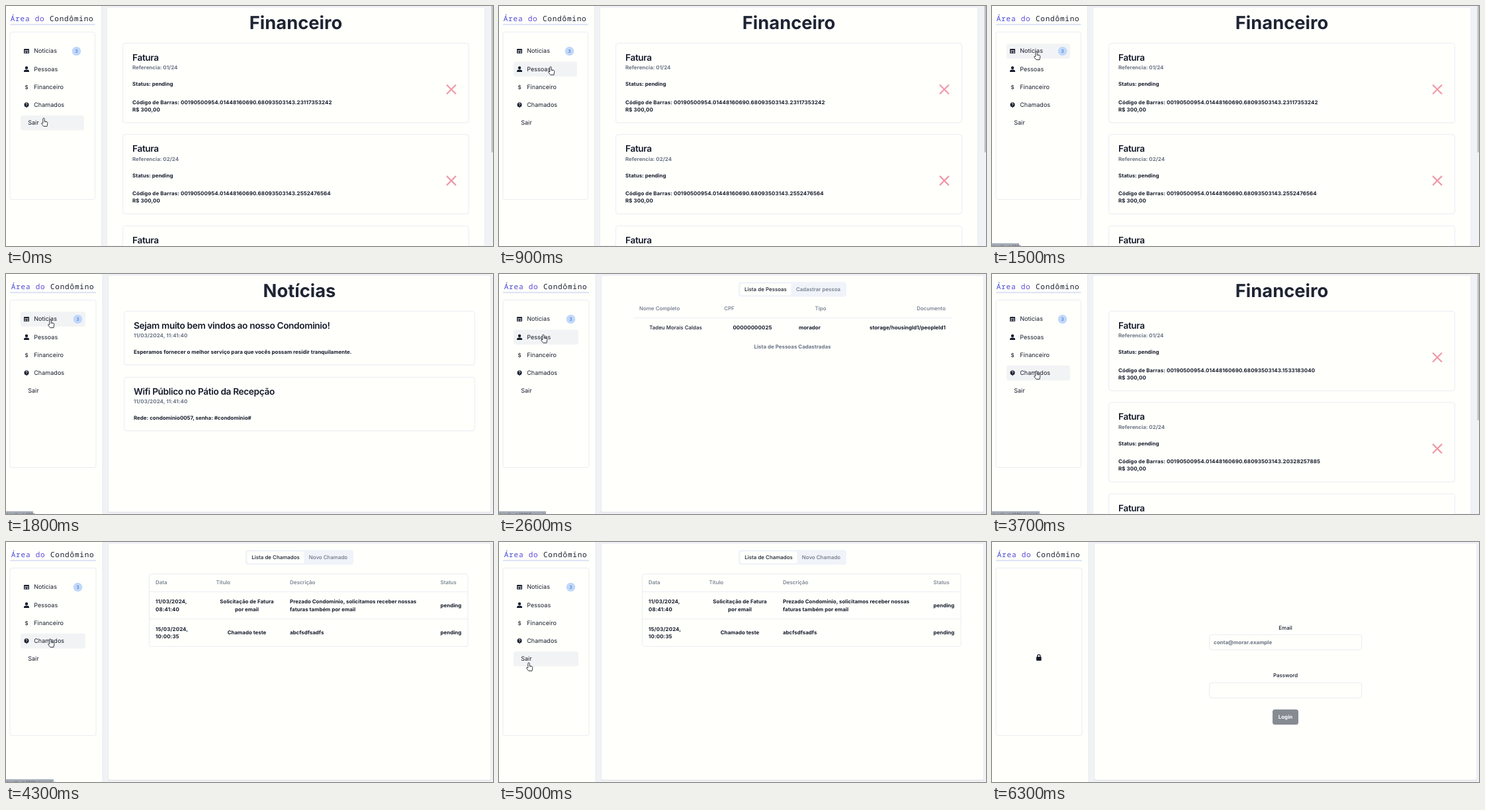
Write an HTML page that moves like this. It is 736 px wide and 364 px high and loops after 6700 ms.

```html
<!DOCTYPE html>
<html lang="pt">
<head>
<meta charset="utf-8">
<title>Área do Condômino</title>
<style>
  html, body { margin: 0; width: 100%; height: 100%; overflow: hidden; background: #f1f2f5; }
  svg { display: block; width: 736px; height: 364px; font: 700 7.9px Inter, sans-serif; letter-spacing: .03px; fill: #151b2a; }
  text { white-space: pre; text-rendering: geometricPrecision; }
  .logo { font: 500 11px "Noto Sans Mono", monospace; letter-spacing: .8px; }
  .h1 { font-size: 27.3px; fill: #1e2433; }
  .h2 { font-size: 13.64px; font-weight: 600; letter-spacing: -.025em; }
  .nav { font-size: 9.04px; font-weight: 400; }
  .digits { letter-spacing: .125px; }
  .muted { fill: #6a7484; }
  .medium { font-weight: 500; }
  .head { fill: #6a7484; font-weight: 500; }
  .badge { font-size: 7px; font-weight: 400; fill: #4568a8; }
  .url { font-size: 6px; font-weight: 400; fill: #3a404a; }
  .middle { text-anchor: middle; }
  .end { text-anchor: end; }
</style>
</head>
<body>
<svg id="stage" viewBox="0 0 736 364"></svg>
<script>
const LOOP = 6700, STEP = 100;
const PAPER = '#fffffc', LINE = '#eaedf2', INK = '#151b2a';
const ROW_TOP = 68.5, ROW_PITCH = 27.2;
const stage = document.getElementById('stage');

const text = (x, y, str, cls = '') => `<text x="${x}" y="${y}" class="${cls}">${str}</text>`;
const rect = (x, y, right, bottom, fill, r = 0, stroke = 'none') =>
  `<rect x="${x}" y="${y}" width="${right - x}" height="${bottom - y}" rx="${r}" fill="${fill}" stroke="${stroke}"/>`;
const path = (d, fill, stroke = 'none', width = 1) =>
  `<path d="${d}" fill="${fill}" stroke="${stroke}" stroke-width="${width}"/>`;
const card = (x, y, right, bottom) =>
  rect(x, y + .6, right, bottom + .6, '#f3f4f6', 4) + rect(x, y, right, bottom, PAPER, 4, LINE);

// [start time, page]
const schedule = [
  [0, 'bills'], [1800, 'news'], [2600, 'people'],
  [3300, 'bills'], [4300, 'tickets'], [5300, 'login']
];

// [time, x, y]
const pointerKeys = [
  [0, 58, 176], [700, 80, 101], [900, 79, 98], [1400, 68, 75], [1800, 68, 75],
  [2100, 68, 98], [2600, 68, 98], [3000, 69, 125], [3300, 69, 125],
  [3700, 68, 153], [4300, 68, 153], [4700, 46, 189], [5300, 46, 189]
];

function pointerAt(t) {
  const i = pointerKeys.findIndex(k => k[0] > t);
  const [t0, x0, y0] = pointerKeys[i - 1], [t1, x1, y1] = pointerKeys[i];
  const u = (t - t0) / (t1 - t0), e = u * u * (3 - 2 * u);
  return { x: x0 + (x1 - x0) * e, y: y0 + (y1 - y0) * e };
}

function bills(t) {
  const codes = t < 1800 ? ['23117353242', '2552476564'] : ['1533183040', '20328257885'];
  const bill = (code, i) => `<g transform="translate(0 ${i * 138.4})">` +
    card(176.5, 56.5, 699.5, 177) +
    text(191, 83, 'Fatura', 'h2') +
    text(191, 96.4, `Referencia: 0${i + 1}/24`, 'muted') +
    text(191, 121.4, 'Status: pending') +
    text(191, 148.5, `Código de Barras: 00190500954.01448160690.68093503143.${code}`, 'digits') +
    text(191, 159.7, 'R$ 300,00', 'digits') +
    path('M666 119.5l14 14m0 -14l-14 14', 'none', '#f09aa8', 2.2) + '</g>';
  return text(438, 35, 'Financeiro', 'h1 middle') + [...codes, ''].map(bill).join('');
}

function news() {
  const post = (y, title, body) => card(178.5, y, 708.5, y + 81.3) +
    text(193, y + 26.5, title, 'h2') +
    text(193, y + 39.8, '11/03/2024, 11:41:40', 'muted digits') +
    text(193, y + 64.9, body);
  return text(443.5, 35, 'Notícias', 'h1 middle') +
    post(56.5, 'Sejam muito bem vindos ao nosso Condominio!',
      'Esperamos fornecer o melhor serviço para que vocês possam residir tranquilamente.') +
    post(156.5, 'Wifi Público no Pátio da Recepção',
      'Rede: condominio0057, senha: #condominio#');
}

const tabs = (active, other, edge, center) =>
  rect(362, 12, 525, 34.5, '#f0f3f9', 4) + rect(364.5, 14.5, edge, 32, PAPER, 2.5) +
  text((364.5 + edge) / 2, 26, active, 'medium middle') +
  text(center, 26, other, 'medium muted middle');

function people() {
  return tabs('Lista de Pessoas', 'Cadastrar pessoa', 441.5, 482.5) +
    text(212, 55, 'Nome Completo', 'head') + text(348, 55, 'CPF', 'head middle') +
    text(486, 55, 'Tipo', 'head middle') + text(675, 55, 'Documento', 'head end') +
    rect(203, 66, 684, 67, LINE) +
    text(267, 83.5, 'Tadeu Morais Caldas', 'medium middle') +
    text(383, 83.5, '00000000025', 'digits middle') + text(469.5, 83.5, 'morador', 'middle') +
    text(675, 83.5, 'storage/housingId1/peopleId1', 'end') +
    text(443.5, 113, 'Lista de Pessoas Cadastradas', 'muted middle');
}

function tickets() {
  const lines = (x, y, rows, cls) =>
    rows.map((s, i) => text(x, y + (i - (rows.length - 1) / 2) * 11.3, s, cls)).join('');
  const row = (y, date, title, body) => lines(226, y, date, 'digits') +
    lines(364, y, title, 'middle') + lines(429, y, body) + text(656.5, y, 'pending');
  const heads = [[226, 'Data'], [317.5, 'Título'], [429, 'Descrição'], [656.5, 'Status']];
  return tabs('Lista de Chamados', 'Novo Chamado', 450.5, 487) +
    rect(216.5, 48.5, 698, 158.5, 'none', 3, LINE) +
    heads.map(([x, s]) => text(x, 64.4, s, 'head')).join('') +
    rect(217, 75, 698, 76, LINE) + rect(217, 116.3, 698, 117.3, LINE) +
    row(99, ['11/03/2024,', '08:41:40'], ['Solicitação de Fatura', 'por email'],
      ['Prezado Condominio, solicitamos receber nossas', 'faturas também por email']) +
    row(140.3, ['15/03/2024,', '10:00:35'], ['Chamado teste'], ['abcfsdfsadfs']);
}

function login() {
  return text(443.5, 132.5, 'Email', 'medium middle') +
    rect(328.5, 140.5, 558.5, 163.5, PAPER, 3.5, LINE) +
    text(335, 155.3, 'conta@morar.example', 'muted') +
    text(443.5, 204.7, 'Password', 'medium middle') +
    rect(328.5, 213.5, 558.5, 236.5, PAPER, 3.5, LINE) +
    rect(424, 254, 463, 277, '#868b92', 3.5) +
    `<g fill="#fff">${text(443.5, 268.4, 'Login', 'middle')}</g>`;
}

const pages = { bills, news, people, tickets, login };

const icons = [
  rect(27, -3.5, 35, 3.5, INK, .8) +
    path('M28 -1h6M28 .8h2.3M28 2.3h2.3M31.5 .8h2.5M31.5 2.3h2.5', 'none', '#fff', .8),
  '<circle cx="31" cy="-2" r="2.2"/>' + path('M27 4.2V3Q27 .8 31 .8T35 3V4.2Z', INK),
  text(31, 3.2, '$', 'medium middle'),
  '<circle cx="31" cy="-.4" r="3.5"/>' + path('M30 2h2.5L31 4.6Z', INK) +
    path('M29.8 -1.4Q29.9 -2.5 31 -2.5T32.2 -1.4Q32.2 -.8 31 0V.6M31 1.3V2', 'none', '#fff', .8),
  ''
];

function nav(shift, hovered) {
  const labels = ['Noticias', 'Pessoas', 'Financeiro', 'Chamados', 'Sair'];
  return labels.map((label, i) => `<g transform="translate(0 ${ROW_TOP + i * ROW_PITCH})">` +
    (i === hovered ? rect(22, -11.3, 118 + shift, 11.3, '#f2f3f5', 3.5) : '') +
    icons[i] + text(i < 4 ? 42.2 : 33.2, 2.9, label, 'nav') + '</g>').join('') +
    `<circle cx="${106.5 + shift}" cy="68.5" r="6.8" fill="#bfd8fc"/>` +
    text(106.5 + shift, 71, '3', 'badge middle');
}

const lock = rect(67, 174, 74.6, 180, INK, 1) +
  path('M68.6 174.5V173a2.2 2.2 0 0 1 4.4 0v1.5', 'none', INK, 1.2);

function frame(page) {
  if (page === 'bills')
    return rect(152.5, 2, 723.5, 364, PAPER, 0, '#eceef1') + rect(733.5, 0, 736, 222, '#bfc1c4');
  return rect(154, 3, 733, 362.3, '#dfe1e5', 2) + rect(154.5, 2, 732.5, 361, PAPER, 2, '#e9ebee');
}

function sidebar(shift, content) {
  const edge = 144.5 + shift * .75;
  return rect(0, 0, edge, 364, PAPER) + rect(edge - .5, 0, edge + .5, 364, '#e8eaed') +
    '<linearGradient id="ink" gradientUnits="userSpaceOnUse" x1="7" x2="60">' +
    '<stop stop-color="#4049d0"/><stop offset="1" stop-color="#5f45da"/></linearGradient>' +
    text(6.7 + shift / 2, 23, '<tspan fill="url(#ink)">Área do</tspan> Condômino', 'logo') +
    rect(6, 27, edge - 10, 29.2, '#dfe4f4') +
    rect(6, 39.5, edge - 10, 293.5, 'none', 3, LINE) + content;
}

function statusBar(t) {
  if (t < 1500 || t >= 4400) return '';
  const [width, url] = t < 2600 ? [41, 'localhost:3001'] :
    t < 3300 ? [71, 'localhost:3001/financeiro'] : [72, 'localhost:3001/chamados'];
  return rect(0, 359.8, width, 364, '#a4abb6') + text(2, 366.9, url, 'url');
}

const hand = ({ x, y }) => `<g transform="translate(${x - 1} ${y - 5.5})">` +
  path('M-1.2 .8Q-1.2 -.4 0 -.4T1.2 .8V4.2L5 5.2Q6 5.6 5.8 7L5 12H-.2L-3.4 8Q-3.6 6.2 -1.2 7.4Z',
    '#fff', '#22262e', .9) +
  path('M1.2 4.2V6M3 4.8V6.2', 'none', '#22262e', .6) + '</g>';

function scene(t) {
  const page = schedule.findLast(([start]) => start <= t)[1];
  const shift = page === 'bills' ? 0 : 2;
  const pointer = page === 'login' ? null : pointerAt(t);
  const content = pointer
    ? nav(shift, Math.round((pointer.y - 6 - ROW_TOP) / ROW_PITCH))
    : lock;
  return frame(page) + pages[page](t) + sidebar(shift, content) +
    statusBar(t) + (pointer ? hand(pointer) : '');
}

let shown = -1;
function tick() {
  const t = Math.floor(performance.now() % LOOP / STEP) * STEP;
  if (t !== shown) stage.innerHTML = scene(shown = t);
  requestAnimationFrame(tick);
}
tick();
</script>
</body>
</html>
```
